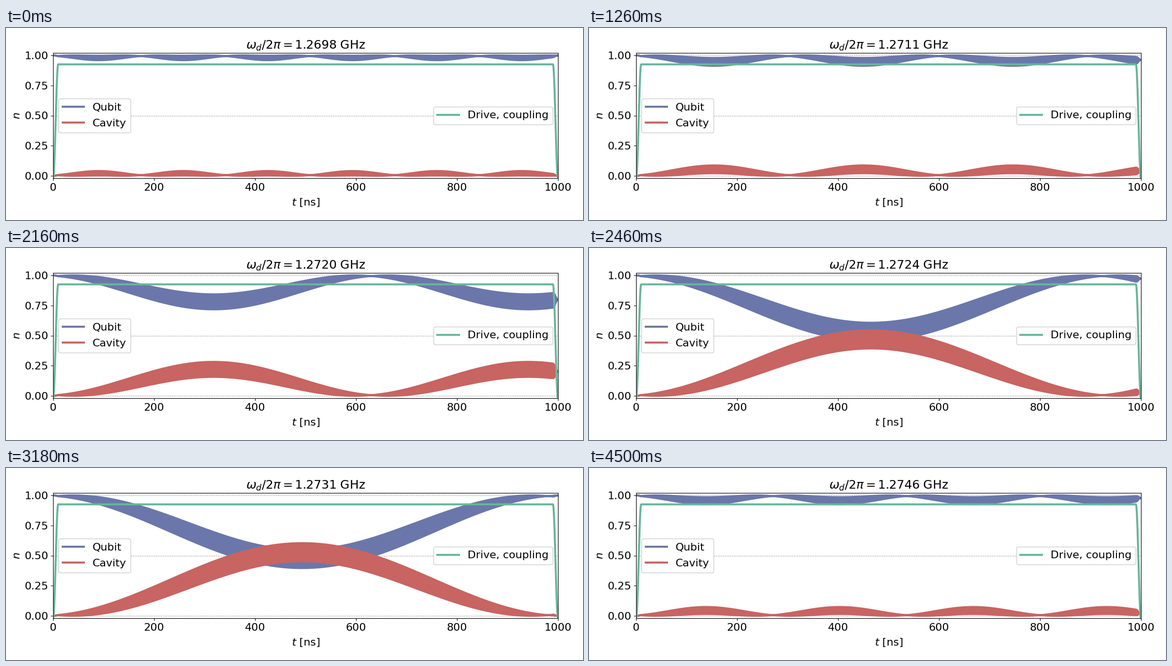
Write a matplotlib script that moves like this. It is 1200 px wide and 400 px high and loops after 4.56 s.

```python
import numpy as np
import matplotlib.pyplot as plt
from matplotlib.animation import FuncAnimation
from matplotlib.patches import Polygon

FRAMES, INTERVAL = 76, 60
BLUE, RED, GREEN = "#6b77aa", "#c86462", "#67b79a"

T_END, RAMP = 1000.0, 10.0      # ns
COUPLING = 0.746                # MHz
F_START, F_RES = 1269.8, 1272.76  # MHz
F_STEP = 0.0625
RIPPLE = 0.076                  # mixing angle of the fast oscillation

plt.rcParams.update({"font.family": "DejaVu Sans", "font.size": 16,
                     "legend.framealpha": 1})

t = np.linspace(0, T_END, 2001)
edge = np.clip(np.minimum(t, T_END - t) / RAMP, 0, 1)
pulse = np.sin(np.pi / 2 * edge) ** 2
# pulse area of the two-photon process
power = pulse ** 2
tau = np.concatenate([[0], np.cumsum((power[1:] + power[:-1]) / 2 * np.diff(t))])


def drive_freq(i):
    """Drive frequency in MHz; the sweep is a little faster at its end."""
    return F_START + F_STEP * np.interp(i, [0, 61, 75], [0, 61, 77])


def cavity_band(freq):
    """Lower and upper envelope of the cavity population."""
    detuning = 2 * (freq - F_RES)
    rabi = np.hypot(COUPLING, detuning)
    amp = COUPLING / rabi * np.abs(np.sin(np.pi * rabi * tau * 1e-3))
    angle = np.arcsin(amp)
    wobble = RIPPLE * pulse
    return np.sin(angle - wobble) ** 2, np.sin(angle + wobble) ** 2


def outline(low, high):
    return np.column_stack([np.r_[t, t[::-1]], np.r_[low, high[::-1]]])


fig = plt.figure(figsize=(12, 4), dpi=100, facecolor="white")
ax = fig.add_axes([98 / 1200, 87 / 400, 1050 / 1200, 261 / 400])
ax.set(xlim=(0, T_END), ylim=(-0.02, 1.02), yticks=np.linspace(0, 1, 5))
ax.set_xlabel("$t$ [ns]", labelpad=6.5)
ax.set_ylabel("$n$")
title = ax.set_title("", fontsize=18)

for level in (0, 0.5, 1):
    ax.axhline(level, color="gray", ls=":", lw=1, zorder=1)


def add_band(color, z):
    band = Polygon([[0, 0], [1, 0], [1, 1]], closed=True, facecolor=color,
                   edgecolor=color, lw=3, joinstyle="round", zorder=z)
    ax.add_patch(band)
    return band


qubit = add_band(BLUE, 2)
cavity = add_band(RED, 2.1)
keys = [plt.Line2D([], [], color=c, lw=3) for c in (BLUE, RED)]
ax.legend(keys, ["Qubit", "Cavity"], loc="center left", labelspacing=0.6)

drive_ax = ax.twinx()
drive_ax.set(ylim=(0, 1.1), yticks=[])
drive_ax.plot(t, pulse, color=GREEN, lw=3, label="Drive, coupling")
drive_ax.legend(loc="center right")


def update(i):
    freq = drive_freq(i)
    low, high = cavity_band(freq)
    cavity.set_xy(outline(low, high))
    qubit.set_xy(outline(1 - high, 1 - low))
    title.set_text(rf"$\omega_d/2\pi = {freq / 1000:.4f}$ GHz")
    return qubit, cavity, title


anim = FuncAnimation(fig, update, frames=FRAMES, interval=INTERVAL,
                     repeat=True, repeat_delay=0, blit=False)
plt.show()
```
